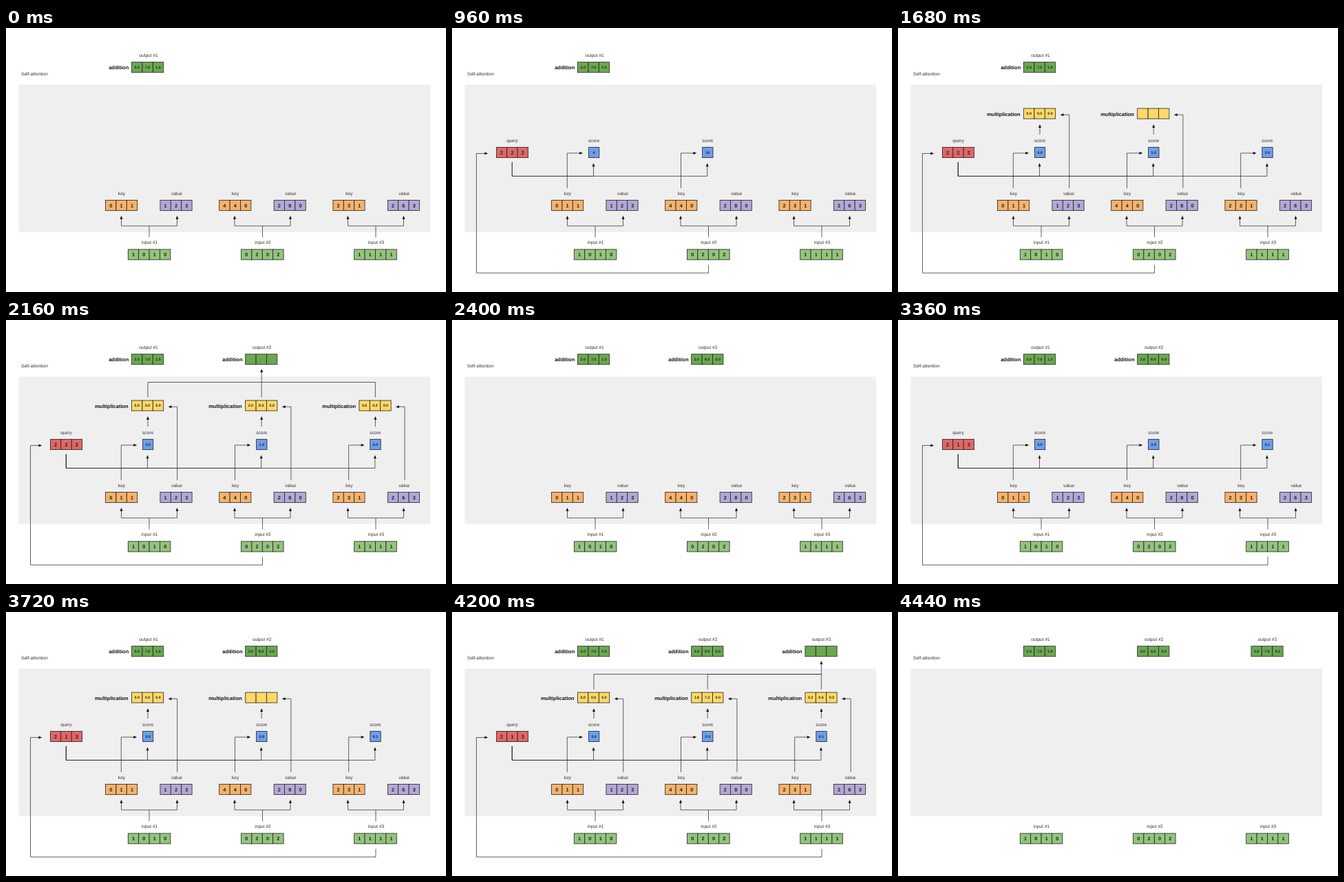
Write an HTML page that moves like this. It is 639 px wide and 384 px high and loops after 4920 ms.

```html
<!DOCTYPE html>
<html lang="en">
<head>
<meta charset="utf-8">
<title>Self-attention</title>
<style>
  html, body { margin: 0; width: 100%; height: 100%; overflow: hidden; background: #fff; }
  svg { display: block; width: 100%; height: 100%; }
  text { font-family: "Liberation Sans", Arial, sans-serif; fill: #333; text-rendering: geometricPrecision; }
  .label { font-size: 6.6px; text-anchor: middle; }
  .title { font-size: 6.6px; }
  .op { font-size: 7.5px; font-weight: bold; text-anchor: end; fill: #111; }
  .num { font-size: 7.3px; font-weight: bold; text-anchor: middle; fill: #222; }
  .small { font-size: 5.3px; }
  .cell { stroke: #222; stroke-width: .8; }
  .wire { fill: none; stroke: #222; stroke-width: .7; }
  .tip { fill: #111; }
</style>
</head>
<body>
<svg id="stage" viewBox="0 0 639 384">
  <rect x="18.5" y="82.4" width="597.5" height="214.6" fill="#efefef"/>
  <text class="title" x="22" y="69.1">Self-attention</text>
</svg>
<script>
const stage = document.getElementById('stage');
const LOOP = 4920, HOLD = 480, TICK = 120, LAST = 34, CYCLE = 17;
const CELL = 15.4;
const COLOR = {
  input: '#93c47d', key: '#f6b26b', value: '#b4a7d6', query: '#e06666',
  score: '#6d9eeb', mult: '#ffd966', output: '#6aa84f'
};
const inputs = [[1, 0, 1, 0], [0, 2, 0, 2], [1, 1, 1, 1]];
const keys = [[0, 1, 1], [4, 4, 0], [2, 3, 1]];
const values = [[1, 2, 3], [2, 8, 0], [2, 6, 3]];
const parts = [];

// Show a group of markup during steps from <= step < to.
function show(from, to, markup) {
  const g = document.createElementNS('http://www.w3.org/2000/svg', 'g');
  g.innerHTML = markup;
  stage.append(g);
  parts.push({ g, from, to });
}

const label = (x, y, s) => `<text class="label" x="${x}" y="${y}">${s}</text>`;
const op = (x, y, s) => `<text class="op" x="${x}" y="${y}">${s}</text>`;

function boxes(x, y, n, color) {
  let s = '';
  for (let i = 0; i < n; i++)
    s += `<rect class="cell" x="${x + i * CELL}" y="${y}" width="${CELL}" height="15" fill="${color}"/>`;
  return s;
}

function digits(x, y, list, small) {
  const base = y + (small ? 9.4 : 10.2);
  return list.map((d, i) =>
    `<text class="num${small ? ' small' : ''}" x="${x + (i + .5) * CELL}" y="${base}">${d}</text>`).join('');
}

const vector = (x, y, list, color, small) =>
  boxes(x, y, list.length, color) + digits(x, y, list, small);

const wire = pts => `<polyline class="wire" points="${pts.join(' ')}"/>`;

// Polyline whose last point is the tip of an arrowhead.
function arrow(...pts) {
  const [x, y] = pts[pts.length - 1], [px, py] = pts[pts.length - 2];
  const dx = Math.sign(x - px), dy = Math.sign(y - py);
  const bx = x - dx * 5, by = y - dy * 5;
  pts[pts.length - 1] = [bx, by];
  return wire(pts) + `<path class="tip" d="M${x} ${y}L${bx - dy * 2} ${by + dx * 2}L${bx + dy * 2} ${by - dx * 2}Z"/>`;
}

const col = i => i * 165.2;
const feed = i => 208 + i * 164.5;
const fixed = list => list.map(v => v.toFixed(1));

function output(i, from, list) {
  const x = 182.5 + col(i);
  show(from, Infinity, label(207 + i * 164.7, 41.8, 'output #' + (i + 1)) + boxes(x, 49.7, 3, COLOR.output));
  show(from, LAST, op(x - 4.2, 59.8, 'addition'));
  show(from ? from + 1 : 0, Infinity, digits(x, 49.7, fixed(list), true));
}

for (let i = 0; i < 3; i++) {
  const c = col(i), f = feed(i);
  show(0, Infinity, label(f + .5, 314, 'input #' + (i + 1)) +
    vector(177.3 + i * 164.2, 322, inputs[i], COLOR.input));
  show(0, LAST,
    label(168 + c, 243, 'key') + vector(144.5 + c, 250.4, keys[i], COLOR.key) +
    label(248 + c, 243, 'value') + vector(223.9 + c, 250.4, values[i], COLOR.value) +
    wire([[f, 304.5], [f, 287.9]]) +
    arrow([f, 287.9], [f - 40.5, 287.9], [f - 40.5, 273]) +
    arrow([f, 287.9], [f + 40.5, 287.9], [f + 40.5, 273]));
}

function attend(i, start, query) {
  const end = start + CYCLE, f = feed(i);
  const scores = keys.map(k => k.reduce((sum, v, j) => sum + v * query[j], 0));
  const total = scores.reduce((sum, s) => sum + Math.exp(s), 0);
  const weights = scores.map(s => Math.round(Math.exp(s) / total * 10) / 10);
  const sums = [0, 1, 2].map(j => weights.reduce((sum, w, n) => sum + w * values[n][j], 0));

  show(start + 1, end,
    label(87.5, 166, 'query') + vector(64.4, 173.6, query, COLOR.query) +
    arrow([f, 344.5], [f, 356.3], [35.5, 356.3], [35.5, 182.5], [52.3, 182.5]));

  for (let n = 0; n < 3; n++) {
    const c = col(n), mid = 206 + c, sx = 198.4 + c, mx = 182.5 + c;
    const s = start + 2 + n * 2, m = start + 9 + n * 2;
    show(s, end,
      label(mid, 166, 'score') + boxes(sx, 173.6, 1, COLOR.score) +
      arrow([87.3, 195], [87.3, 215.5], [mid - .5, 215.5], [mid - .5, 196.5]) +
      arrow([167.3 + c, 233], [167.3 + c, 182], [190.2 + c, 182]));
    show(s + 1, start + 8, digits(sx, 173.6, [scores[n]], true));
    show(start + 8, end, digits(sx, 173.6, fixed([weights[n]]), true));

    show(m, end,
      op(mx - 4.8, 127.8, 'multiplication') + boxes(mx, 117, 3, COLOR.mult) +
      arrow([mid, 155], [mid, 140]) +
      arrow([248.7 + c, 233], [248.7 + c, 126.2], [235.5 + c, 126.2]));
    show(m + 1, end, digits(mx, 117, fixed(values[n].map(v => v * weights[n])), true));
  }

  const ox = 206 + col(i);
  show(start + 15, end, [0, 1, 2].map(n => {
    const x = 206 + col(n);
    return wire([[x, 112.5], [x, 90.5], [ox, 90.5]]);
  }).join('') + arrow([ox, 90.5], [ox, 71]));
  output(i, start + 15, sums);
}

output(0, 0, [2, 7, 1.5]);
attend(1, 0, [2, 2, 2]);
attend(2, CYCLE, [2, 1, 3]);

let current = -1;
function draw(now) {
  const t = now % LOOP;
  const step = t < HOLD ? 0 : Math.min(LAST, Math.floor((t - HOLD) / TICK) + 1);
  if (step !== current) {
    current = step;
    for (const p of parts)
      p.g.style.display = step >= p.from && step < p.to ? '' : 'none';
  }
}

const begin = performance.now();
function loop() {
  draw(performance.now() - begin);
  requestAnimationFrame(loop);
}
loop();
</script>
</body>
</html>
```
